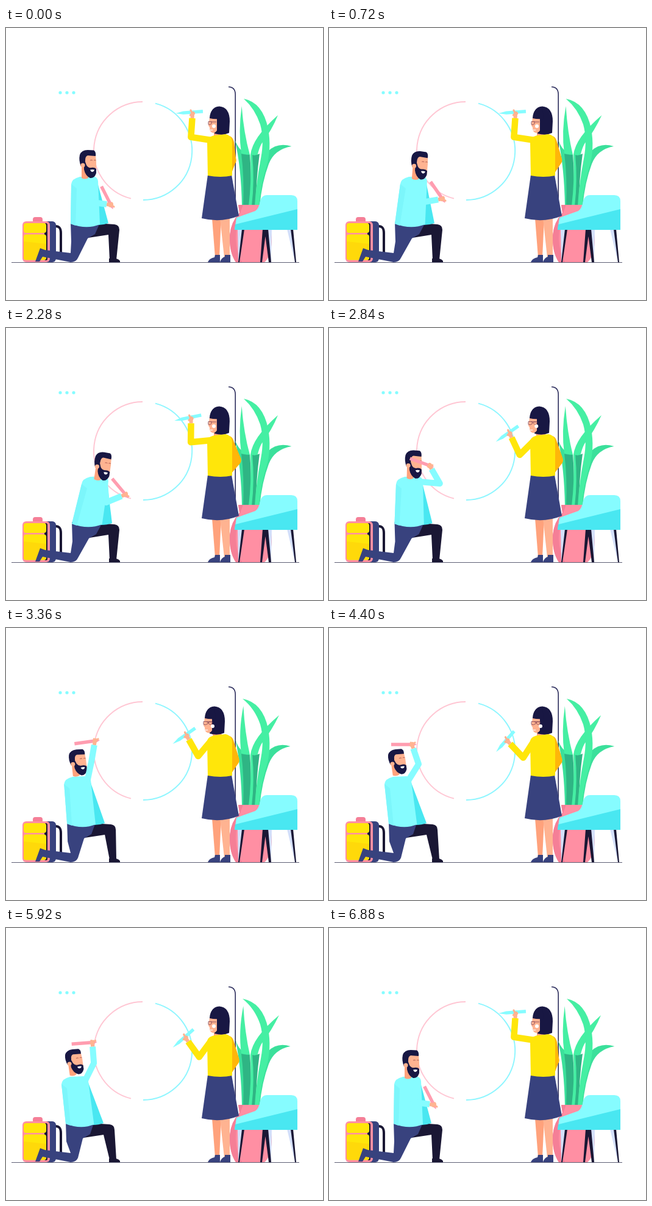
These frames come from a looping animation (520x446 px, 6920 ms). An HTML page with a canvas:

```html
<!DOCTYPE html>
<html lang="en">
<head>
<meta charset="utf-8">
<title>Drawing a circle together</title>
<style>
html, body { margin: 0; width: 100%; height: 100%; overflow: hidden; background: #fff; }
canvas { display: block; width: 520px; height: 446px; }
</style>
</head>
<body>
<canvas id="stage" width="520" height="446"></canvas>
<script>
const LOOP = 6920, SWAY = LOOP / 3, STROKE = 2080;
const C = {
  cyan: '#86fcff', teal: '#49e7f1', shade: '#7cf6fb', pink: '#ff8fa3', rose: '#f57f97',
  yellow: '#ffe60a', orange: '#ffb60a', navy: '#38427e', ink: '#1a1734', hair: '#181743',
  skin: '#ffb391', tan: '#ffa27c', mint: '#45efa3', leaf: '#3be09b', green: '#2fb584', pale: '#d4e0fb'
};
const ctx = document.getElementById('stage').getContext('2d');

function ramp(t, from, to) {
  const u = Math.max(0, Math.min(1, (t - from) / (to - from)));
  return u * u * (3 - 2 * u);
}
// How far each part of the movement has gone at time t
function phases(t) {
  const back = ramp(t, 5920, 6880);
  const right = ramp(t, 0, 1300) - ramp(t, 2280, 3300);
  const reach = ramp(t, 2300, 3300) - back;
  return {
    right, reach,
    lean: 17 * right - 16 * (ramp(t, 2300, 3900) - back),
    low: ramp(t, 1900, 3200) - back,
    nod: ramp(t, 2200, 3300) - ramp(t, 3400, 4300),
    turn: ramp(t, 2200, 3200) - ramp(t, 4600, 5400),
    stroke: reach * Math.cos(2 * Math.PI * (t - 3360) / STROKE)
  };
}

function fill(color, d) {
  ctx.fillStyle = color;
  ctx.fill(new Path2D(d));
}
function line(color, width, d) {
  ctx.strokeStyle = color;
  ctx.lineWidth = width;
  ctx.stroke(new Path2D(d));
}
function disc(color, x, y, r) {
  ctx.fillStyle = color;
  ctx.beginPath();
  ctx.arc(x, y, r, 0, 7);
  ctx.fill();
}
function box(color, x, y, w, h, r) {
  ctx.fillStyle = color;
  ctx.beginPath();
  ctx.roundRect(x, y, w, h, r);
  ctx.fill();
}
function placed(x, y, degrees, paint) {
  ctx.save();
  ctx.translate(x, y);
  ctx.rotate(degrees * Math.PI / 180);
  paint();
  ctx.restore();
}
// Pencil held at a distance from its blunt end
function pencil(color, x, y, degrees, held, length, neck) {
  placed(x, y, degrees, () =>
    fill(color, `M${-held} -2.7H${length * neck - held}L${length - held} 0L${length * neck - held} 2.7H${-held}Z`));
}
// Two-bone arm: the elbow follows from shoulder and hand
function arm(color, width, sx, sy, hx, hy, upper, fore, side) {
  const dx = hx - sx, dy = hy - sy;
  const d = Math.min(Math.hypot(dx, dy), upper + fore - .01);
  const along = (upper * upper - fore * fore + d * d) / (2 * d);
  const out = side * Math.sqrt(Math.max(0, upper * upper - along * along));
  const ex = sx + (dx * along - dy * out) / d, ey = sy + (dy * along + dx * out) / d;
  const k = 1 - 7 / fore, wx = ex + (hx - ex) * k, wy = ey + (hy - ey) * k;
  line(C.skin, 6, `M${wx} ${wy}L${hx} ${hy}`);
  ctx.lineJoin = 'round';
  line(color, width, `M${sx} ${sy}L${ex} ${ey}L${wx} ${wy}`);
  ctx.lineJoin = 'miter';
}
function hand(x, y, dx, dy) {
  ctx.lineCap = 'round';
  line(C.skin, 6, `M${x - 1} ${y + 1}L${x + 1} ${y - 1}`);
  line(C.skin, 3.2, `M${x} ${y}l${dx} ${dy}M${x} ${y}l${dy * .6} ${-dx * .6}`);
  ctx.lineCap = 'butt';
}

function backdrop() {
  for (let i = 0; i < 3; i++) disc(C.cyan, 89 + 11 * i, 106, 2.6);
  line('#ffc6d3', 1.9, 'M224 121A80.5 80.5 0 0 0 205 279.6');
  line('#8df6ff', 1.9, 'M245 123.6A80.5 80.5 0 0 1 225 282');
  line('#2c2d5c', 1.6, 'M365 96.5Q376.2 97 376.2 109V292');
}

function plant(s) {
  fill(C.leaf, `M${376 + s * .5} 183Q382 203 399 207Q404 250 400 292H387Q386 230 ${376 + s * .5} 183Z`);
  fill(C.green, 'M386 206Q394 209 400 207Q404 250 399 292H389Q391 245 386 206Z');
  fill(C.mint, `M${388 + s * 1.4} 128Q${391 + s} 172 400 208L386 206Q381 170 ${388 + s * 1.4} 128Z`);
  fill(C.mint, `M${447 + s} 143Q436 168 419 190Q411 205 409 235Q408 266 404 292H398Q403 250 401 208Q404 180 ${447 + s} 143Z`);
  fill(C.green, 'M404 208Q409 210 416 206Q410 250 410 292H403Q408 250 404 208Z');
  fill(C.leaf, `M${467.5 - s} 194Q445 187 430 202Q418 222 411 292H416Q420 252 431 223Q440 199 ${467.5 - s} 194Z`);
  fill(C.mint, `M${389 - s} 116Q421 122 430 165Q436 198 427 228Q417 260 415 292H408Q410 256 418 214Q424 183 417 158Q408 132 ${389 - s} 116Z`);
  fill(C.pink, 'M381 290H416Q412 299 418 306Q437 323 436 350Q434 376 424 384H377Q366 368 367 340Q369 318 383 303Z');
  fill(C.rose, 'M381 290H389Q377 318 377 345Q378 370 387 384H377Q366 368 367 340Q369 318 383 303Z');
}

function chair() {
  fill(C.pale, 'M380 330H389L383 384H381ZM461 330H470L476 384H474ZM430 330H436L435 384H432Z');
  fill(C.ink, 'M387 330H391L383 384H381ZM467 330H471L476 384H474ZM421 330H427L420 384H417ZM424 330H430L435 384H431Z');
  fill(C.cyan, 'M375 331L378 311L409 300Q415 296 417 283Q420 274 428 274H468Q478 274 478 284V331Z');
  fill(C.teal, 'M376 322L478 297V331H375Z');
}

function womanHead(nod, turn) {
  placed(-8 * nod, 0, 0, () => {
    fill(C.hair, 'M335 153Q334 129 350 128.5Q367 130 367 153L366 172Q355 177 342 173L343 150Z');
    fill(C.skin, 'M334 147H346V168Q342 174 337 171Q334 169 334 163L332 160Z');
    fill(C.hair, 'M334 148Q335 130 350 129L352 149Q342 150 334 148Z');
    disc('#fff', 341 + turn * 6, 161, 3);
    line('#8a4a58', .9, `M332 153.5H${337 + turn * 2}V157Q335 160 332 158ZM337 154H345`);
    ctx.globalAlpha = turn;
    line('#8a4a58', .9, 'M340.5 153.5H346V157Q343 160 340.5 157Z');
    ctx.globalAlpha = 1;
    line('#fff', 1.2, 'M335 167Q337 168 339 167');
  });
}

function woman({ right, reach, low, nod, turn, stroke }) {
  const hx = 306 - 11.5 * low + 2 * stroke, hy = 141 + 40 * low - 4 * stroke;
  const elbow = 378 + 8 * right + 5 * reach;
  fill(C.tan, 'M338 312H353L350 376H343Z');
  fill(C.skin, 'M351 312H367V376H358Z');
  fill(C.navy, 'M331 384Q333 378 342 376L343 372H351V384ZM351 384Q353 377 359 375V372H368V384Z');
  fill(C.orange, `M366 177Q372 178 374 187L${elbow - 1} 213Q${elbow + 1} 218 ${elbow - 2} 222L370 238Z`);
  fill(C.navy, 'M331 241H370L382 308Q353 320 321 312Z');
  fill(C.tan, `M${341 - 8 * nod} 164H${355 - 8 * nod}L357 179H341Z`);
  fill(C.yellow, 'M330 187Q330 178 343 176L360 174Q371 176 371 188V242Q352 246 331 242Z');
  pencil(C.cyan, hx, hy - 3, 176 - 38 * low + 7 * stroke, 17, 45, .72);
  arm(C.yellow, 10.5, 337, 184, hx, hy, 34, 38, -1);
  hand(hx, hy, -3, -6);
  womanHead(nod, turn);
}

function backpack() {
  line(C.ink, 4, 'M80 325Q90 324 90 336V372');
  box(C.rose, 44, 310, 16, 12, 4);
  box(C.navy, 55, 317, 27, 67, 6);
  box(C.pink, 27, 317, 45, 67, 6);
  box(C.ink, 63, 320, 5, 61, 3);
  box(C.yellow, 29, 320, 37, 16, 4);
  box(C.yellow, 29, 338.5, 37, 42, 4);
  fill('#ffd90a', 'M29 350L66 354V377Q66 380 62 380H33Q29 380 29 376Z');
}

function manHead(x, y, degrees) {
  placed(x, y, degrees, () => {
    ctx.scale(1, 1 + Math.min(0, degrees) * .012);
    fill(C.tan, 'M-10 4H1V24Q-5 27 -10 24Z');
    fill(C.skin, 'M-6 -14H13L14 -2V14H-4Z');
    fill(C.hair, 'M-13 -14Q-10 -22 0 -22L10 -21.5Q14 -19 13 -12L0 -13Q-4 -12 -4 -5L-5 1L-11 5Q-15 -5 -13 -14Z');
    fill(C.hair, 'M-6 -8L-2 3Q1 8 6 7Q11 6 14 9V16Q11 25 4 24Q-4 20 -6 10Z');
    fill('#fff', 'M4 10.5Q8 9.5 11 10.5Q10 14 7 14Q5 13.5 4 10.5Z');
    disc(C.skin, -8, 3, 3.5);
    line('#a95750', .9, 'M4 -5Q6 -6 8 -5M10 -5Q12 -6 13.5 -5');
  });
}

// The lean carries head, shoulders, hip and knee along
function man({ right, reach, lean, stroke }) {
  const left = 107 + lean, front = 150 + lean;
  const hip = 106 + .5 * Math.min(lean, 4), hem = 154 + .6 * Math.min(lean, 6);
  const flap = 168 + .5 * Math.min(lean, 12), knee = 186 + .5 * Math.min(lean, 0);
  const hx = 172 + 24 * right - 31 * reach + 5 * stroke;
  const hy = 290 - 17 * right - 102 * reach - 3 * stroke;

  fill(C.ink, `M${hip + 30} 330L${hem - 6} 320L${knee - 8} 322Q${knee} 323 ${knee} 331L181 380H170L${knee - 18} 339L${hip + 29} 344Z`);
  fill(C.ink, 'M169 384V378Q183 376 187 382V384Z');
  fill(C.navy, `M${hip} 318L${hip + 1} 350L106 369L64 364L56 361L48 383H55L60 375L106 384Q115 384 118 377L${hip + 28} 345L${hip + 40} 338L${hem - 1} 322Z`);
  fill(C.teal, `M${front - 2} 246L${flap} 320Q${flap - 8} 323 ${hem - 2} 323Z`);
  fill(C.cyan, `M${left} 256Q${left + 1} 247 ${left + 14} 244L${front - 7} 243Q${front} 244 ${front + 1} 251L${hem} 322Q${(hip + hem) / 2 + 2} 331 ${hip} 321Z`);
  fill(C.shade, `M${left} 256L${left + 9} 263L${hip + 8} 324L${hip} 321Z`);
  manHead(134 + 1.4 * lean, 222 + .2 * lean, .5 * lean);
  pencil('#ff9db0', hx, hy, 63 - 13 * right - 67 * reach - 4 * stroke, 34, 42, .86);
  arm(C.cyan, 10, front - 5, 252, hx, hy, 34, 34, 1);
  hand(hx, hy, 5, 3 - 6 * reach);
}

function draw(t) {
  const now = phases(t);
  ctx.fillStyle = '#fff';
  ctx.fillRect(0, 0, 520, 446);
  backdrop();
  plant(-Math.cos(2 * Math.PI * t / SWAY));
  chair();
  line('#5f6076', 1, 'M9 384.5H481');
  woman(now);
  backpack();
  man(now);
}

const start = performance.now();
function tick() {
  draw((performance.now() - start) % LOOP);
  requestAnimationFrame(tick);
}
tick();
</script>
</body>
</html>
```
